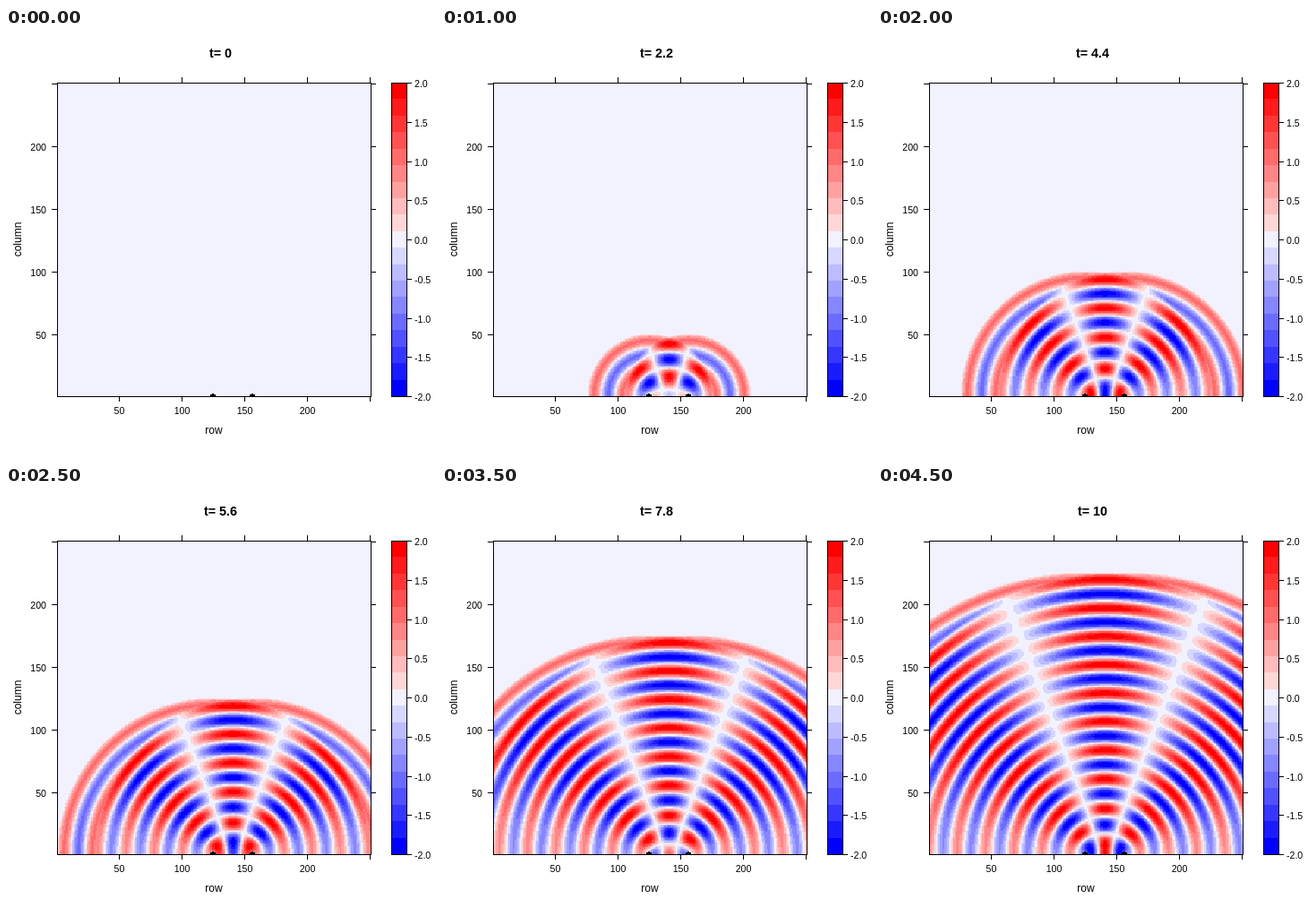
Animation, 480 px wide and 480 px high, one loop 5000 ms. Source, as an HTML page with a canvas:

```html
<!DOCTYPE html>
<html>
<head>
<meta charset="utf-8">
<style>
  html, body { margin: 0; width: 100%; height: 100%; overflow: hidden; background: #fff; }
  canvas { display: block; }
</style>
</head>
<body>
<canvas id="stage" width="480" height="480"></canvas>
<script>
const ctx = document.getElementById('stage').getContext('2d');
const FONT = '"Liberation Sans", Arial, sans-serif';
const LEFT = 57, TOP = 61, SIZE = 350, RIGHT = LEFT + SIZE, BOTTOM = TOP + SIZE;
const CELL = 1.4;
const SPEED = 22.5;          // cells per time unit; also the wavelength
const SOURCES = [125, 156];  // rows of the emitters, both in column 1
const STEPS = 10, STEP_MS = 500, BINS = 19;

// Blue-white-red ramp of 20 colours; one pale pink is skipped to leave 19 bins.
const palette = Array.from({ length: BINS }, (_, i) => {
  const k = i > 9 ? i + 1 : i;
  const c = Math.round(255 * Math.min(k, 19 - k) / 9.5);
  return k < 10 ? [c, c, 255] : [255, c, c];
});

function binOf(value) {
  return Math.max(0, Math.min(BINS - 1, Math.floor((value + 2) / 4 * BINS)));
}

function waveAt(row, column, t) {
  let sum = 0;
  for (const source of SOURCES) {
    const delay = Math.hypot(row - source, column - 1) / SPEED;
    if (delay < t) sum += Math.sin(2 * Math.PI * (t - delay));
  }
  return sum;
}

function rect(x, y, w, h, color = '#000') {
  ctx.fillStyle = color;
  ctx.fillRect(x, y, w, h);
}

function frame(x, y, w, h) {
  ctx.strokeStyle = '#000';
  ctx.lineWidth = 1;
  ctx.strokeRect(x + 0.5, y + 0.5, w, h);
}

function text(label, x, y, size, align = 'center', weight = '') {
  ctx.font = `${weight} ${size}px ${FONT}`;
  ctx.textAlign = align;
  ctx.fillStyle = '#000';
  ctx.fillText(label, x, y);
}

function drawField(t) {
  const image = ctx.createImageData(SIZE, SIZE);
  for (let py = 0; py < SIZE; py++) {
    const column = 1 + Math.floor((SIZE - py) / CELL);
    for (let px = 0; px < SIZE; px++) {
      const row = 1 + Math.floor((px - 0.1) / CELL);
      const color = palette[binOf(waveAt(row, column, t))];
      image.data.set([...color, 255], (py * SIZE + px) * 4);
    }
  }
  ctx.putImageData(image, LEFT, TOP);
  for (const x of [231, 275]) {
    rect(x - 3, 409, 6, 2);
    rect(x - 1, 408, 2, 1);
  }
  frame(LEFT, TOP, SIZE, SIZE);
}

function drawAxes() {
  for (let n = 50; n <= 250; n += 50) {
    const x = Math.floor(57 + (n - 0.5) * CELL), y = Math.floor(412 - (n - 0.5) * CELL);
    rect(x, TOP - 6, 1, 6);
    rect(x, BOTTOM, 1, 6);
    rect(LEFT - 6, y, 6, 1);
    rect(RIGHT, y, 6, 1);
    if (n < 250) {
      text(n, x + 0.5, 431, 10.6);
      text(n, 45, y + 5, 10.6, 'right');
    }
  }
  text('row', 232, 453, 12);
  ctx.save();
  ctx.translate(17, 236);
  ctx.rotate(-Math.PI / 2);
  text('column', 0, 0, 12);
  ctx.restore();
}

function drawKey() {
  const edge = i => Math.round(BOTTOM - i * SIZE / BINS);
  palette.forEach((c, i) => rect(430, edge(i + 1), 17, edge(i) - edge(i + 1), `rgb(${c})`));
  frame(430, TOP, 17, SIZE);
  for (let v = -2; v <= 2; v += 0.5) {
    const y = Math.round(236 - v * 87.5);
    rect(447, y, 6, 1);
    text(v.toFixed(1), 456, y + 5, 10.6, 'left');
  }
}

function draw(step) {
  const t = 10 * step / (STEPS - 1);
  rect(0, 0, 480, 480, '#fff');
  drawField(t);
  drawAxes();
  drawKey();
  text('t= ' + Number(t.toFixed(1)), 239.5, 33, 14.4, 'center', 'bold');
}

let shown = -1;
const start = performance.now();
function tick() {
  const step = Math.floor((performance.now() - start) / STEP_MS) % STEPS;
  if (step !== shown) draw(shown = step);
  requestAnimationFrame(tick);
}
tick();
</script>
</body>
</html>
```
